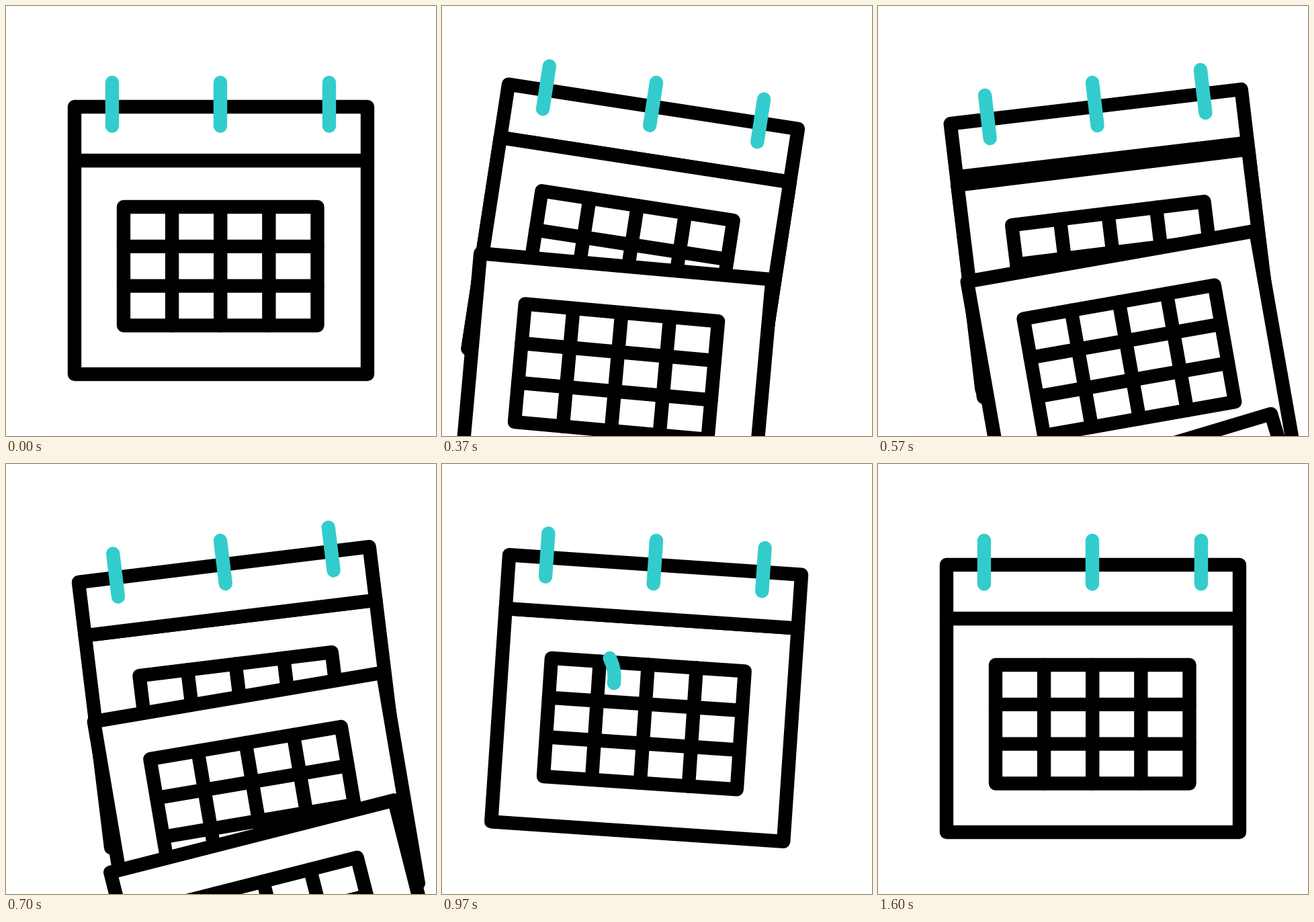
Write an HTML page with a canvas that moves like this. It is 640 px wide and 640 px high and loops after 1670 ms.

```html
<!DOCTYPE html>
<html lang="en">
<head>
<meta charset="utf-8">
<title>Calendar</title>
<style>
  html, body { margin: 0; width: 100%; height: 100%; overflow: hidden; background: #fff; }
  canvas { display: block; width: 640px; height: 640px; }
</style>
</head>
<body>
<canvas id="stage" width="640" height="640"></canvas>
<script>
const ctx = document.getElementById('stage').getContext('2d');
const LOOP = 1670, STEP = 100 / 3;
const INK = '#000', TEAL = '#33cccc', RAD = Math.PI / 180;
const PIVOT = { x: 319, y: 114 };
const PAGE = { x: 102, y: 230, w: 436, h: 318 };
const GRID = { x: 175, y: 299, w: 288.5, h: 176.5, cols: 4, rows: 3 };

// Times below are in animation steps of 1/30 s.
const SWING = [[2, 0], [9, 10], [19, -8], [28, 4], [35, 0]];
const PAGE_STARTS = [15.42, 10.77, 4.35];
const FALL = { steps: 20.8, dx: 27, dy: 667, turn: -15 };
const MARK = { x: 206.2, y: 326, r: 64.4, from: -30.5, draw: [27.1, 37.1], erase: [38, 48] };

const progress = (t, a, b) => Math.min(1, Math.max(0, (t - a) / (b - a)));
const smooth = p => p * p * (3 - 2 * p);
const swingEase = p => p < 0.5 ? (2 * p) ** 2.15 / 2 : 1 - (2 - 2 * p) ** 2.15 / 2;

function swingAngle(t) {
  let angle = 0;
  for (let i = 1; i < SWING.length; i++) {
    const [t0, a0] = SWING[i - 1], [t1, a1] = SWING[i];
    if (t >= t0) angle = a0 + (a1 - a0) * swingEase(progress(t, t0, t1));
  }
  return angle;
}

function line(x1, y1, x2, y2) {
  ctx.beginPath();
  ctx.moveTo(x1, y1);
  ctx.lineTo(x2, y2);
  ctx.stroke();
}

function box(x, y, w, h) {
  ctx.beginPath();
  ctx.rect(x, y, w, h);
  ctx.fill();
  ctx.stroke();
}

function rotateAbout(x, y, degrees) {
  ctx.translate(x, y);
  ctx.rotate(degrees * RAD);
  ctx.translate(-x, -y);
}

function drawPage() {
  const { x, y, w, h, cols, rows } = GRID;
  box(PAGE.x, PAGE.y, PAGE.w, PAGE.h);
  box(x, y, w, h);
  for (let c = 1; c < cols; c++) line(x + w * c / cols, y, x + w * c / cols, y + h);
  for (let r = 1; r < rows; r++) line(x, y + h * r / rows, x + w, y + h * r / rows);
}

function drawFallingPage(p) {
  ctx.save();
  ctx.translate(FALL.dx * p, FALL.dy * p);
  rotateAbout(PAGE.x + PAGE.w / 2, PAGE.y + PAGE.h / 2, FALL.turn * p);
  drawPage();
  ctx.restore();
}

function drawMark(t) {
  const head = smooth(progress(t, ...MARK.draw));
  const tail = smooth(progress(t, ...MARK.erase));
  if (head <= tail) return;
  ctx.beginPath();
  ctx.arc(MARK.x, MARK.y, MARK.r, (MARK.from + 360 * tail) * RAD, (MARK.from + 360 * head) * RAD);
  ctx.stroke();
}

function draw(t) {
  ctx.fillStyle = '#fff';
  ctx.fillRect(0, 0, 640, 640);
  ctx.save();
  rotateAbout(PIVOT.x, PIVOT.y, swingAngle(t));
  ctx.lineWidth = 20.4;
  ctx.lineCap = ctx.lineJoin = 'round';

  ctx.strokeStyle = INK;
  drawPage();
  box(PAGE.x, 150, PAGE.w, 80);
  for (const start of PAGE_STARTS) {
    const p = smooth(progress(t, start, start + FALL.steps));
    if (p > 0) drawFallingPage(p);
  }

  ctx.strokeStyle = TEAL;
  for (const x of [158, 319, 481]) line(x, 114, x, 178.5);
  drawMark(t);
  ctx.restore();
}

function tick() {
  const ms = performance.now() % LOOP;
  draw(Math.floor((ms + 5) / STEP));
  requestAnimationFrame(tick);
}
tick();
</script>
</body>
</html>
```
